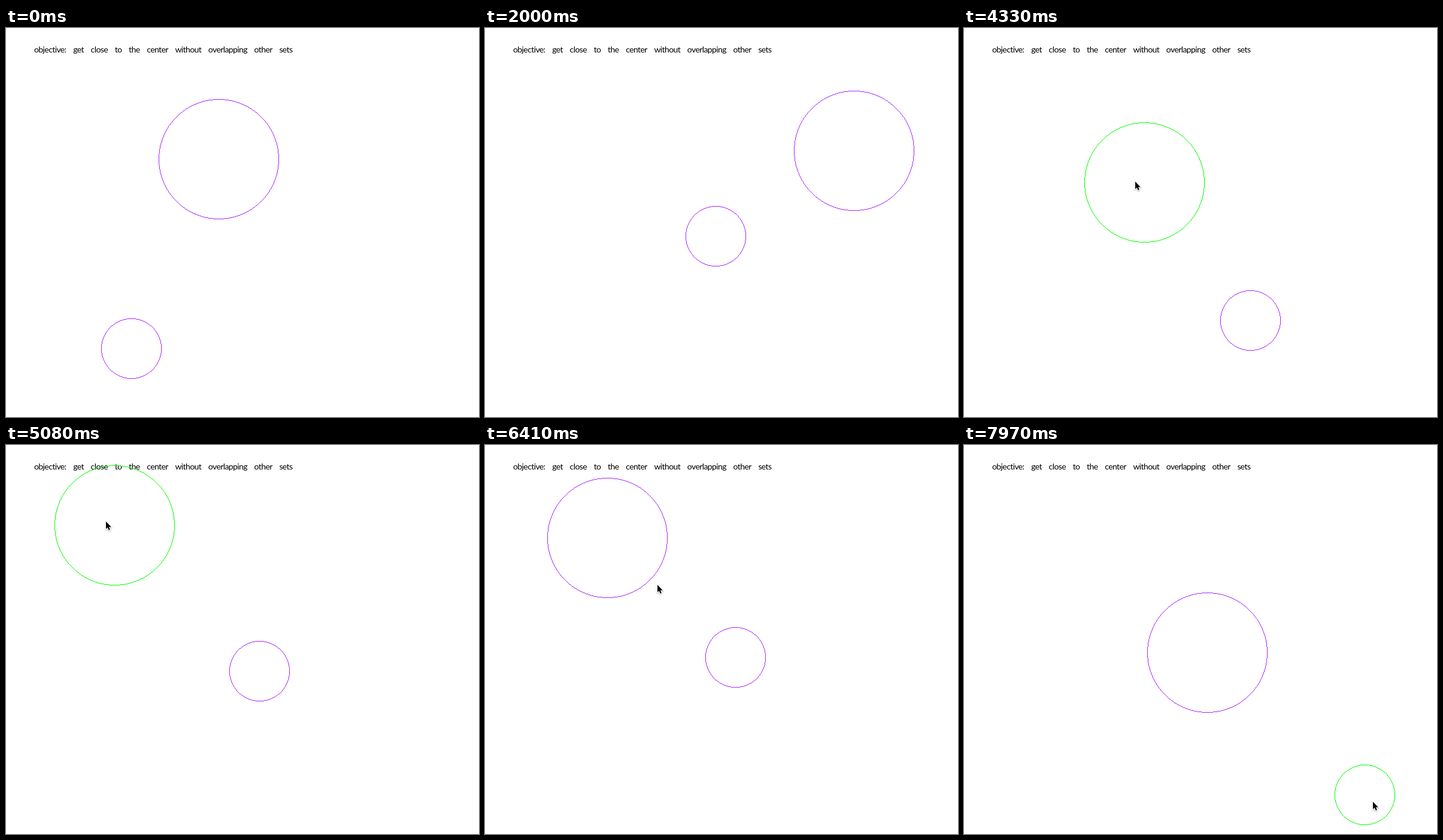
Recreate the animation shown at these times as an HTML page with a canvas. Size 790 by 651 pixels, loop 8 s.

```html
<!DOCTYPE html>
<html lang="en">
<head>
<meta charset="utf-8">
<title>Two sets</title>
<style>
  html, body { margin: 0; width: 100%; height: 100%; overflow: hidden; background: #fff; }
  canvas { display: block; }
</style>
</head>
<body>
<canvas id="stage" width="790" height="651"></canvas>
<script>
const ctx = document.getElementById('stage').getContext('2d');
const LOOP = 8000;
const IDLE = '#a828ff', HELD = '#00ff00';

const linear = u => u;
const smooth = u => u * u * (3 - 2 * u);
const out = power => u => 1 - (1 - u) ** power;
const drift = out(1.5), settle = out(2.5);

// A mover rests at its place until the next leg begins
class Mover {
  constructor(x, y) {
    this.home = { x, y };
    this.legs = [];
  }
  go(from, to, x, y, ease = linear) {
    this.legs.push({ from, to, x, y, ease });
    return this;
  }
  at(t) {
    let { x, y } = this.home;
    for (const leg of this.legs) {
      if (t <= leg.from) break;
      const k = leg.ease(Math.min(1, (t - leg.from) / (leg.to - leg.from)));
      x += (leg.x - x) * k;
      y += (leg.y - y) * k;
    }
    return [Math.round(x), Math.round(y)];
  }
}

const big = new Mover(355, 219)
  .go(30, 820, 545, 332)
  .go(820, 1250, 750, 120)
  .go(1250, 2000, 616, 205, settle)
  .go(2390, 2950, 385, 315, smooth)
  .go(3870, 3990, 418, 346, smooth)
  .go(3990, 4330, 301, 258)
  .go(4330, 5830, 115, 67, drift)
  .go(5830, 6500, 209, 159, smooth)
  .go(7120, 7220, 223, 171)
  .go(7220, 7970, 406, 347);

const small = new Mover(209, 536)
  .go(30, 820, 275, 350)
  .go(820, 2000, 385, 348, settle)
  .go(2390, 2950, 496, 562, smooth)
  .go(3870, 3990, 499, 596, smooth)
  .go(3990, 4330, 478, 489)
  .go(4330, 5830, 411, 354, settle)
  .go(5830, 6280, 418, 355)
  .go(7120, 7220, 434, 378)
  .go(7220, 7970, 669, 585);

const pointer = new Mover(734, 651)
  .go(3090, 3390, 429, 359)
  .go(3870, 4330, 286, 256, smooth)
  .go(4330, 5830, 102, 56, drift)
  .go(5830, 6940, 450, 386, smooth)
  .go(7120, 7220, 464, 400)
  .go(7220, 7970, 683, 596);

// One-pixel ring without smoothing
function ring([cx, cy], r, color) {
  ctx.fillStyle = color;
  for (let a = 0; a <= r * Math.SQRT1_2 + 0.5; a++) {
    const b = Math.round(Math.sqrt(r * r - a * a));
    for (const [x, y] of [[a, b], [b, a]]) {
      for (const px of [cx - x, cx + x]) {
        ctx.fillRect(px, cy - y, 1, 1);
        ctx.fillRect(px, cy + y, 1, 1);
      }
    }
  }
}

function caption() {
  ctx.fillStyle = '#000';
  ctx.font = '14px Lato, "Open Sans", sans-serif';
  ctx.letterSpacing = '-0.6px';
  ctx.wordSpacing = '8.7px';
  ctx.fillText('objective: get close to the center without overlapping other sets', 47, 41);
}

const arrow = new Path2D('M0 0V12.5L2.8 10L4.8 14.5L6.8 13.6L4.9 9.2H8.8Z');

function cursor([x, y]) {
  ctx.save();
  ctx.translate(x, y + 1);
  ctx.shadowColor = 'rgba(0,0,0,.35)';
  ctx.shadowBlur = 2;
  ctx.shadowOffsetY = 1;
  ctx.strokeStyle = '#fff';
  ctx.lineWidth = 2;
  ctx.stroke(arrow);
  ctx.shadowColor = 'transparent';
  ctx.fillStyle = '#000';
  ctx.fill(arrow);
  ctx.restore();
}

function draw(t) {
  ctx.fillStyle = '#fff';
  ctx.fillRect(0, 0, 790, 651);
  caption();
  ring(big.at(t), 100, t >= 3870 && t < 6400 ? HELD : IDLE);
  ring(small.at(t), 50, t >= 7120 ? HELD : IDLE);
  if (t >= 3090) cursor(pointer.at(t));
}

const start = performance.now();
function tick() {
  draw((performance.now() - start) % LOOP);
  requestAnimationFrame(tick);
}
tick();
</script>
</body>
</html>
```
